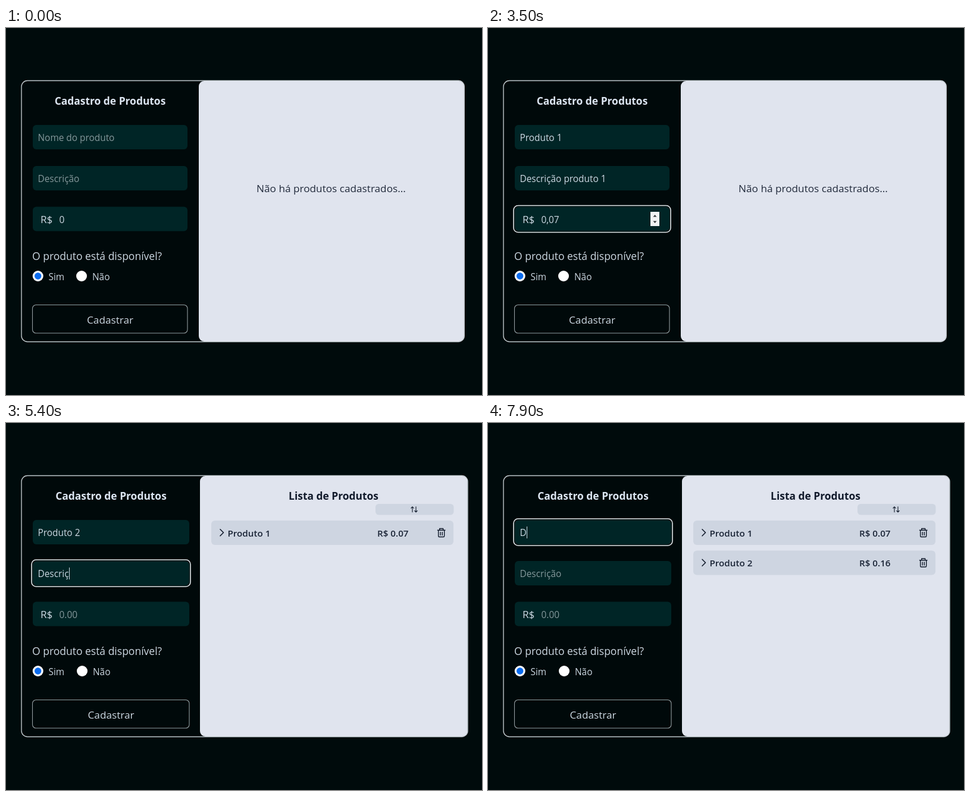
Animation, 800 px wide and 617 px high, one loop 8 s. Source, as an HTML page with a canvas:

```html
<!DOCTYPE html>
<html lang="pt-BR">
<head>
<meta charset="utf-8">
<title>Cadastro de Produtos</title>
<style>
html, body { margin: 0; width: 100%; height: 100%; overflow: hidden; background: #000b0c; }
canvas { display: block; width: 800px; height: 617px; }
</style>
</head>
<body>
<canvas id="stage" width="800" height="617"></canvas>
<script>
const ctx = document.getElementById('stage').getContext('2d');
const LOOP = 8000, STEP = 100;
const FIRST_SAVE = 3600, SECOND_SAVE = 6700;
const FONT = '"Open Sans", "Noto Sans", sans-serif';
const INK = '#111a2b', LIGHT = '#cdd8e2', MUTED = '#85989b', PANEL = '#e0e4ee', ROW = '#ced5e1';

function roundRect(x, y, w, h, r, fill, stroke, lineWidth) {
  ctx.beginPath();
  ctx.roundRect(x, y, w, h, r);
  if (fill) { ctx.fillStyle = fill; ctx.fill(); }
  if (stroke) { ctx.strokeStyle = stroke; ctx.lineWidth = lineWidth; ctx.stroke(); }
}

function text(str, x, y, size, color, weight = 400, align = 'left') {
  ctx.font = `${weight} ${size}px ${FONT}`;
  ctx.fillStyle = color;
  ctx.textAlign = align;
  ctx.fillText(str, x, y);
}

function disc(x, y, r, color) {
  ctx.beginPath();
  ctx.arc(x, y, r, 0, Math.PI * 2);
  ctx.fillStyle = color;
  ctx.fill();
}

function lines(d, x, y, width) {
  ctx.save();
  ctx.translate(x, y);
  ctx.strokeStyle = INK;
  ctx.lineWidth = width;
  ctx.lineCap = ctx.lineJoin = 'round';
  ctx.stroke(new Path2D(d));
  ctx.restore();
}

function typed(str, start, end, t, power = 1) {
  const p = Math.min(1, Math.max(0, (t - start) / (end - start)));
  return str.slice(0, Math.round(str.length * p ** power));
}

const money = cents => (cents / 100).toFixed(2).replace('.', ',');

function nameAt(t) {
  if (t < FIRST_SAVE) return typed('Produto 1', 800, 1400, t);
  if (t < SECOND_SAVE) return typed('Produto 2', 4125, 4800, t);
  return t >= 7900 ? 'D' : '';
}

function descriptionAt(t) {
  if (t < FIRST_SAVE) return typed('Descrição produto 1', 1600, 2600, t, 0.74);
  if (t < SECOND_SAVE) return typed('Descrição produto 2', 4990, 6100, t);
  return '';
}

function priceAt(t) {
  if (t < 2900) return '0';
  if (t < FIRST_SAVE) return money(Math.min(7, Math.floor((t - 2800) / 100)));
  if (t >= 6400 && t < SECOND_SAVE) return money(Math.round(16 * (t - 6300) / 300));
  return '';
}

function focusAt(t) {
  const changes = [[0, ''], [600, 'name'], [1600, 'desc'], [2800, 'price'], [4000, 'name'],
    [4900, 'desc'], [6300, 'price'], [7700, 'name']];
  return changes.filter(([start]) => start <= t).pop()[1];
}

function fieldBox(y, w, focused) {
  if (focused) roundRect(43, y - 2, w + 4, 45, 7.5, '#000b0c', '#dfe5e8', 1.6);
  roundRect(45, y, w, 41, 6, '#002526');
}

function textField(value, placeholder, y, w, focused) {
  fieldBox(y, w, focused);
  text(value || placeholder, 53.5, y + 27, 15.4, value ? LIGHT : MUTED);
  if (focused) {
    ctx.fillStyle = LIGHT;
    ctx.fillRect(Math.round(54 + ctx.measureText(value).width), y + 11, 1, 20);
  }
}

function spinner(x, y) {
  ctx.fillStyle = '#f1f3f4';
  ctx.fillRect(x, y, 15, 24);
  ctx.fillStyle = '#303638';
  ctx.fill(new Path2D(`M${x + 4.5} ${y + 8.5}h6l-3-3.5zM${x + 4.5} ${y + 15.5}h6l-3 3.5z`));
}

function priceField(value, y, w, focused) {
  fieldBox(y, w, focused);
  text('R$', 58, y + 27.5, 17.2, LIGHT);
  text(value || '0.00', 89.5, y + 27, 15.4, value ? LIGHT : MUTED);
  if (focused) spinner(13 + w, y + 8.5);
}

function form(t, w) {
  const mid = 45 + w / 2, focus = focusAt(t);
  text('Cadastro de Produtos', mid, 129.3, 17.4, '#dce5f1', 700, 'center');
  textField(nameAt(t), 'Nome do produto', 163, w, focus === 'name');
  textField(descriptionAt(t), 'Descrição', 232, w, focus === 'desc');
  priceField(priceAt(t), 300.5, w, focus === 'price');

  text('O produto está disponível?', 44, 390, 17.5, LIGHT);
  const noX = w > 260 ? 128 : 127;
  disc(53.7, 417, 9, '#f7f9fc');
  disc(53.7, 417, 5.7, '#0b6cf0');
  disc(noX, 417, 9, '#ffffff');
  text('Sim', 71.5, 423.5, 15.4, LIGHT);
  text('Não', noX + 18, 423.5, 15.4, LIGHT);

  roundRect(44.5, 465.5, w + 0.5, 47.5, 6, null, '#929c9f', 1.1);
  text('Cadastrar', mid, 496.5, 17.2, LIGHT, 400, 'center');
}

function productRow(name, price, y) {
  roundRect(345, y, 407, 41, 6, ROW);
  lines('M0 0l5.5 5.5l-5.5 5.5', 360, y + 14.8, 1.6);
  text(name, 372.5, y + 26.7, 15.2, '#1a2436', 600);
  text(price, 624, y + 26.7, 15.2, '#1a2436', 600);
  lines('M-6.3 -4.2h12.6M-3 -4.5v-2.5h6v2.5M-5 -4v9.5q0 1.5 1.5 1.5h7q1.5 0 1.5 -1.5v-9.5M-1.6 -1v5M1.6 -1v5',
    731.7, y + 20.5, 1.4);
}

function productList(t) {
  text('Lista de Produtos', 550.5, 129.3, 17.4, INK, 700, 'center');
  roundRect(621, 136, 131.5, 18.5, 5.5, ROW);
  lines('M-3 4.5v-9l-2.2 2.3m2.2 -2.3l2.2 2.3M3 -4.5v9l-2.2 -2.3m2.2 2.3l2.2 -2.3', 686, 145.3, 1.1);
  productRow('Produto 1', 'R$ 0.07', 164);
  if (t >= SECOND_SAVE) productRow('Produto 2', 'R$ 0.16', 214.5);
}

function draw(t) {
  const saved = t >= FIRST_SAVE;
  const right = saved ? 776 : 770.3, split = saved ? 326 : 324;
  ctx.fillStyle = '#000b0c';
  ctx.fillRect(0, 0, 800, 617);
  roundRect(26, 88.5, right - 26, 439, 10, '#00090a', '#bfc6ca', 1.4);
  roundRect(split, 89, right - split - 0.4, 438, 9, PANEL);
  form(t, saved ? 263 : 260);
  if (saved) productList(t);
  else text('Não há produtos cadastrados...', 546.5, 276, 17.2, '#222b3c', 400, 'center');
}

function tick() {
  const t = performance.now() % LOOP;
  draw(Math.floor(t / STEP) * STEP);
  requestAnimationFrame(tick);
}
tick();
</script>
</body>
</html>
```
